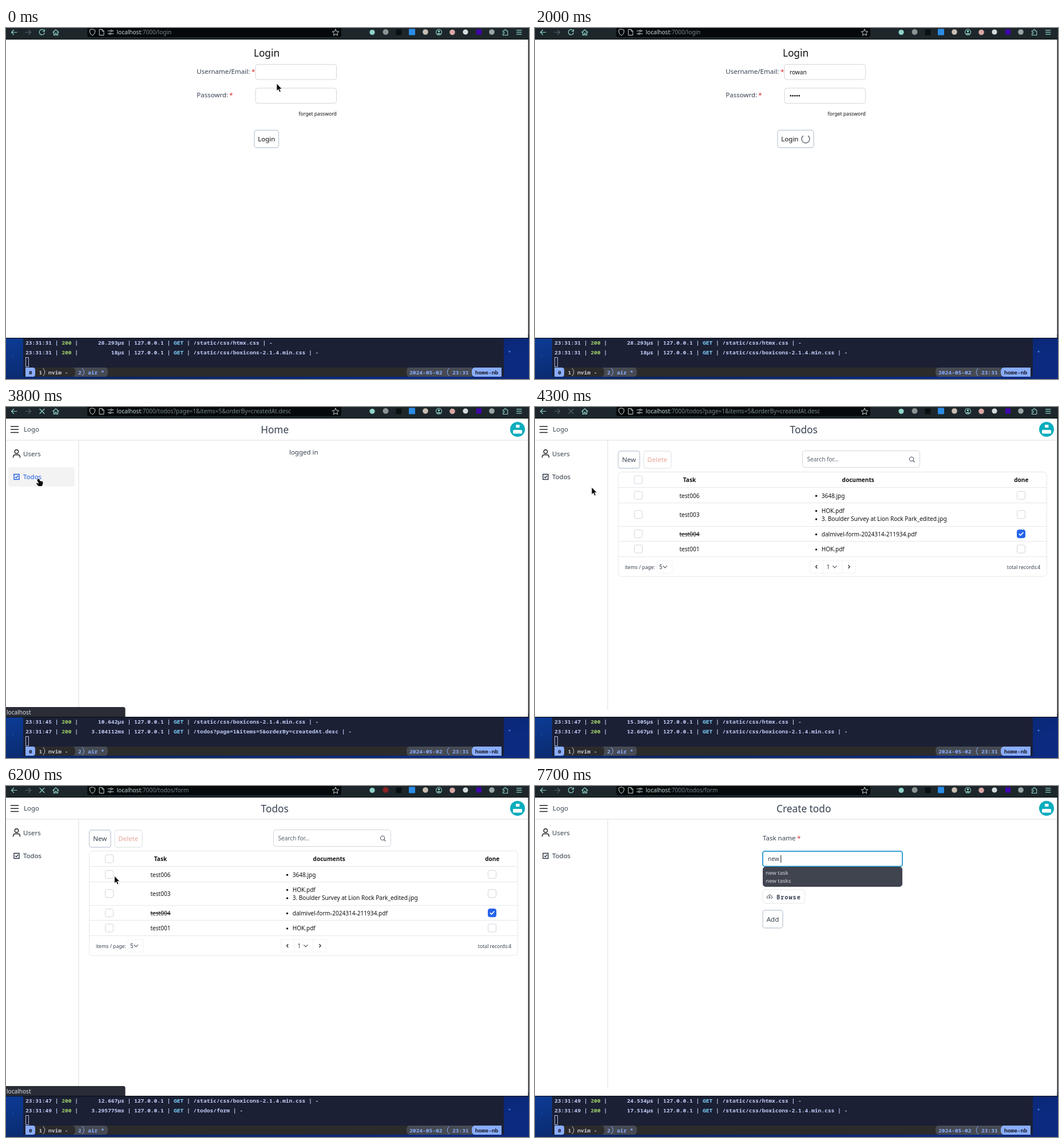
Animation, 914 px wide and 613 px high, one loop 8 s. Source, as an HTML page:

```html
<!DOCTYPE html>
<html lang="en">
<head>
<meta charset="utf-8">
<title>Todo app</title>
<style>
html, body { margin: 0; width: 100%; height: 100%; overflow: hidden; background: #fff; }
svg { display: block; width: 914px; height: 613px; }
text { font-family: "Noto Sans", sans-serif; white-space: pre; }
.mono { font-family: "Noto Sans Mono", "DejaVu Sans Mono", monospace; font-weight: 700; font-size: 9.6px; }
</style>
</head>
<body>
<svg id="stage" viewBox="0 0 914 613" xmlns="http://www.w3.org/2000/svg"></svg>
<script>
const LOOP = 8000, STEP = 100;
const INK = '#374151', LINE = '#e5e7eb', EDGE = '#d1d5db', TEAL = '#8fd3ca', BLUE = '#8aadff';
const BIG = 17.28, MID = 11.52, BODY = 10.08, SMALL = 8.64;

// ---- markup helpers ----
const text = (x, y, s, size = BODY, fill = '#111', more = '') =>
  `<text x="${x}" y="${y}" font-size="${size}" fill="${fill}" ${more}>${s}</text>`;
const mid = (x, y, s, size, fill, more = '') => text(x, y, s, size, fill, 'text-anchor="middle" ' + more);
const mono = (x, y, s, fill, more = '') => `<text class="mono" x="${x}" y="${y}" fill="${fill}" ${more}>${s}</text>`;
const rect = (x, y, w, h, fill, r = 0, stroke = 'none', sw = 1) =>
  `<rect x="${x}" y="${y}" width="${w}" height="${h}" rx="${r}" fill="${fill}" stroke="${stroke}" stroke-width="${sw}"/>`;
const dot = (x, y, r, fill, stroke = 'none', sw = 1) =>
  `<circle cx="${x}" cy="${y}" r="${r}" fill="${fill}" stroke="${stroke}" stroke-width="${sw}"/>`;
const path = (d, stroke = TEAL, sw = 1.2, fill = 'none') =>
  `<path d="${d}" stroke="${stroke}" stroke-width="${sw}" fill="${fill}" stroke-linecap="round" stroke-linejoin="round"/>`;
const group = (id, body, more = '') => `<g id="${id}" ${more}>${body}</g>`;
const button = (x, y, w, h) => rect(x, y, w, h, '#fff', 4, '#c3cddb', 1.4);
const field = (x, y, w, h, stroke = EDGE, sw = 1) => rect(x, y, w, h, '#fff', 4, stroke, sw);
const focusRing = (id, x, y, w, h) => group(id, field(x, y, w, h, '#2596d1', 1.8));
const star = (x, y) => text(x, y, '*', MID, '#dc2626', 'font-weight="500"');
const bold = 'font-weight="600"', medium = 'font-weight="500"';

// ---- desktop and terminal ----
function desktop() {
  const sky = `<defs><linearGradient id="sky" x2="1" y2="0.4"><stop offset="0" stop-color="#0c3d98"/>
    <stop offset="0.5" stop-color="#0a2462"/><stop offset="1" stop-color="#0b2a80"/></linearGradient></defs>`;
  let s = sky + rect(0, 535, 914, 78, 'url(#sky)') + dot(880, 565, 1.6, '#3f7fd8') + dot(12, 572, .8, '#3a6cc4');
  s += rect(30, 535, 840, 74, '#1b2034') + group('log', '') + rect(34.5, 575.5, 5, 16, 'none', 0, '#c0caf5', .9);
  s += rect(34, 593, 832, 16, '#2b2b2c');
  s += path('M34 593H47Q51 593 51 597V605Q51 609 47 609H34Z', 'none', 0, BLUE) + mono(40, 604.5, '0', '#1a1b26');
  s += mono(57.5, 604.5, '1', '#c3c7d4') + path('M65 594.5Q71 601 65 607.5', '#c3c7d4', 1) + mono(74, 604.5, 'nvim -', '#c3c7d4');
  s += path('M116 593H173Q178 593 178 601T173 609H116Q121 609 121 601T116 593Z', 'none', 0, '#464a52');
  s += mono(126, 604.5, '2', BLUE) + path('M133.5 594.5Q139.5 601 133.5 607.5', BLUE, 1) + mono(143, 604.5, 'air *', BLUE);
  s += path('M705 593H815V609H705Q700 609 700 601T705 593Z', 'none', 0, '#464a52');
  s += mono(705, 604.5, '2024-05-02', BLUE) + path('M774 594.5Q768 601 774 607.5', BLUE, 1) + mono(780, 604.5, '23:31', BLUE);
  s += path('M819 593H866V609H819Q814 609 814 601T819 593Z', 'none', 0, BLUE) + mono(820, 604.5, 'home-nb', '#1a1b26');
  return s;
}
const ASSET = ['/static/css/htmx.css', '/static/css/boxicons-2.1.4.min.css'];
function logLine(y, [time, took, url]) {
  const span = (fill, s) => `<tspan fill="${fill}">${s}</tspan>`;
  return mono(34, y, `${time} | ${span('#9ece6a', 200)} |${took.padStart(14)} | 127.0.0.1 | ${span('#7dcfff', 'GET')} | ${url.replace(/&/g, '&amp;')} | -`, '#c0caf5');
}
const assets = (sec, a, b) => [['23:31:' + sec, a, ASSET[0]], ['23:31:' + sec, b, ASSET[1]]];
const LIST = '/todos?page=1&items=5&orderBy=createdAt.desc';
const LOGS = [
  [0, assets(31, '28.293µs', '18µs')],
  [2100, assets(45, '11.106µs', '10.642µs')],
  [3500, [assets(45, '11.106µs', '10.642µs')[1], ['23:31:47', '3.104112ms', LIST]]],
  [4000, assets(47, '15.305µs', '12.667µs')],
  [5900, [assets(47, '15.305µs', '12.667µs')[1], ['23:31:49', '3.295775ms', '/todos/form']]],
  [6400, assets(49, '24.534µs', '17.514µs')]
];
const URLS = [[0, '/login'], [2100, '/home'], [3500, LIST], [5900, '/todos/form']];

// ---- browser toolbar ----
function toolbar() {
  let s = rect(0, 0, 914, 20, '#1d272b') + rect(142, -10, 444, 26, '#05090b', 4) + rect(0, 19, 914, 1.2, '#0a0f11');
  s += path('M19 7.5H9.5M13.5 3.5L9.5 7.5L13.5 11.5') + path('M34 7.5H43.5M39.5 3.5L43.5 7.5L39.5 11.5', '#536066');
  s += group('reload', path('M67.3 8.5A4.6 4.6 0 1 1 66.3 4.2M67.5 2.8V5.8H64.5'));
  s += group('stop', `<path d="M59 3.5L67 11.5M67 3.5L59 11.5" stroke-width="1.2" stroke-linecap="round"/>`);
  s += path('M82 7.5L87 3L92 7.5M83.5 6.5V12.3H86V9H88V12.3H90.5V6.5');
  s += path('M151 2L155.5 3.6V7Q155.3 11 151 13Q146.7 11 146.5 7V3.6Z', '#c7d3d4', 1);
  s += path('M163.5 2.5H168L171 5.5V12.5H163.5ZM168 2.5V5.5H171', '#c7d3d4', 1);
  s += path('M178 5H182M186 5H188M178 10H180M184 10H188', '#c7d3d4', 1) + dot(184, 5, 1.5, 'none', '#c7d3d4') + dot(182, 10, 1.5, 'none', '#c7d3d4');
  s += `<text y="11.2" x="193.5" font-size="${BODY}" fill="#c6d8d8">localhost<tspan id="url" fill="#79878b"></tspan></text>`;
  s += path('M576 2.2L577.7 5.9L581.7 6.3L578.7 9L579.6 13L576 10.9L572.4 13L573.3 9L570.3 6.3L574.3 5.9Z', '#c7d3d4', 1);
  s += dot(640, 7.5, 4.6, TEAL) + `<circle id="guard" cx="663.5" cy="7" r="5"/>`;
  s += rect(681.5, 2.5, 10, 10, '#0a1012', 1) + rect(704, 1.5, 11, 11, '#2a8ce6', 1);
  s += dot(733, 7, 4.8, '#c9beb2');
  s += dot(756.5, 7.3, 5, 'none', TEAL, 1.1) + dot(756.5, 5.8, 1.8, TEAL) + path('M753.4 10.5Q756.5 7.6 759.6 10.5Z', TEAL, .8, TEAL);
  s += dot(780, 7.5, 4.8, '#d9a7a4') + dot(803, 7, 4.6, '#d5dadb') + rect(822, 2.5, 9, 9, '#4005b0') + dot(849, 7, 4.8, '#98a5a6');
  s += path('M868.5 5H871V3.6Q872.5 .8 874 3.6V5H876.7V12.5H868.5V10Q871 10 871 8.6T868.5 7.2Z', TEAL, 1.1);
  return s + path('M892.5 3.8H901M892.5 7.3H901M892.5 10.8H901', TEAL, 1.2);
}

// ---- pages ----
function login() {
  return mid(455.5, 50, 'Login', BIG, '#111') +
    text(333.3, 79.5, 'Username/Email:', MID, INK, medium) + star(429, 79.5) +
    text(333.3, 121, 'Passowrd:', MID, INK, medium) + star(390.3, 121) +
    field(436, 63.5, 141.5, 26.5) + field(436, 105, 141.5, 26.5) +
    focusRing('ringUser', 436, 63.5, 141.5, 26.8) + focusRing('ringPass', 436, 105, 141.5, 26.8) +
    text(445, 80.7, '', BODY, '#111', 'id="user"') + group('dots', '') +
    mid(544.7, 152.7, 'forget password', SMALL, '#111') +
    group('idle', button(434, 178.5, 42.5, 30.5) + mid(455.3, 198, 'Login', MID, '#111')) +
    group('busy', button(424, 178.5, 63, 30.5) + text(430.3, 198, 'Login', MID) +
      `<path id="spin" d="M477.2 188.2A7 7 0 1 1 468.8 188.2" fill="none" stroke="#777c88" stroke-width="1.7"/>`);
}
function shell() {
  return path('M8.5 34H21.5M8.5 39.2H21.5M8.5 44.4H21.5', '#222', 1.5) + text(31, 43, 'Logo', MID, INK) +
    mid(469.7, 46, '', BIG, INK, 'id="title"') +
    dot(894, 39, 13, '#08adbd') + rect(891, 31, 6.5, 5, '#fff', .8) + rect(886, 40, 16, 6.5, '#fff', 1.5) +
    rect(0, 57.3, 912, 1.4, LINE) + rect(126.3, 58, 1.4, 471, LINE) +
    dot(18.5, 78, 3.2, 'none', '#222', 1.4) + path('M12.5 88Q12.5 83.5 16 83.5H21Q24.5 83.5 24.5 88', '#222', 1.4) +
    text(30, 86, 'Users', MID, INK) + group('hover', rect(4, 105, 116, 34, '#f3f3f4', 4)) +
    `<g id="todosLink"><path d="M14 117.5H23V126.5H14ZM16.2 122L18 123.8L21.2 120" fill="none" stroke="currentColor" stroke-width="1.4"/>` +
    text(30, 126, 'Todos', MID, 'currentColor') + '</g>';
}
const ROWS = [
  [154.3, 'test006', ['3648.jpg']],
  [187.8, 'test003', ['HOK.pdf', '3. Boulder Survey at Lion Rock Park_edited.jpg']],
  [221.6, 'test004', ['dalmivel-form-2024314-211934.pdf'], true],
  [248, 'test001', ['HOK.pdf']]
];
function check(x, y, on) {
  const box = rect(x - 7, y - 7, 14, 14, on ? '#2563eb' : '#fff', 3, on ? '#2563eb' : EDGE);
  return on ? box + path(`M${x - 3.2} ${y + .2}L${x - 1} ${y + 2.5}L${x + 3.4} ${y - 2.3}`, '#fff', 1.7) : box;
}
function todos() {
  let s = button(145.5, 77, 37.5, 30) + mid(164.2, 96, 'New', MID, INK);
  s += rect(190, 77, 48, 30, '#fff', 4, LINE, 1.3) + mid(213.8, 96, 'Delete', MID, '#e8a697');
  s += field(467.5, 76.5, 205, 29) + text(475.5, 95.3, 'Search for...', BODY, '#5b6472');
  s += dot(658, 90.9, 3.6, 'none', '#4b5563', 1.1) + path('M660.8 93.7L663 96', '#4b5563');
  s += rect(145.5, 113.5, 749, 182.5, '#fff', 6, LINE);
  for (const y of [140.5, 167.5, 208.5, 234.5, 261.5]) s += rect(145.5, y - .5, 749, 1, LINE);
  s += check(180.5, 127) + mid(270, 131, 'Task', BODY, '#111', bold) + mid(564.7, 131, 'documents', BODY, '#111', bold) + mid(849.8, 131, 'done', BODY, '#111', bold);
  for (const [y, task, docs, done] of ROWS) {
    s += check(180.5, y) + check(849.5, y, done);
    s += mid(270, y + 4.2, task, BODY, '#111', medium + (done ? ' text-decoration="line-through"' : ''));
    docs.forEach((doc, i) => {
      const cy = y + .4 + (i - (docs.length - 1) / 2) * 14.5;
      s += dot(491.5, cy + .5, 1.7, '#111') + text(500.7, cy + 3.8, doc, BODY, '#111', medium);
    });
  }
  s += text(157, 282.5, 'items / page:', SMALL, INK, medium) + rect(213, 268, 27, 22, '#fff', 3, '#f1f2f4');
  s += text(217, 283, '5', BODY, INK) + path('M224 277.5L227.2 281L230.4 277.5', INK, 1.1);
  s += rect(480.5, 268, 79.5, 22, '#fff', 3, '#f1f2f4') + rect(503, 268, 1, 22, '#f1f2f4') + rect(536.5, 268, 1, 22, '#f1f2f4');
  s += path('M492.8 276.5L490.6 279L492.8 281.5M547.8 276.5L550 279L547.8 281.5', '#222', 1.2);
  s += text(509.5, 283, '1', BODY, INK) + path('M520.5 277.5L523.7 281L526.9 277.5', INK, 1.1);
  return s + text(883.3, 282.5, 'total records:4', SMALL, INK, medium + ' text-anchor="end"');
}
function form() {
  return text(398, 94.5, 'Task name', MID, INK, medium) + star(458, 94.5) +
    field(398, 113.8, 244, 26.7) + focusRing('ringTask', 398, 113.8, 244, 26.7) + text(407, 131.2, '', BODY, INK, 'id="task"') +
    rect(398, 181, 73.5, 24, '#fff', 5, LINE) +
    path('M407.3 196.5Q405 196 405.4 193.8Q406 191.8 407.8 192Q408.6 189.6 411 190Q413 190.4 413 192.5Q415 193 414.7 195Q414.2 196.5 413 196.5M410 197V193.2M408.5 194.5L410 193L411.5 194.5', INK, 1) +
    `<text class="mono" x="422" y="198" fill="${INK}" style="font-size:${BODY}px" letter-spacing="1.1">Browse</text>` +
    button(398, 217, 35, 31) + mid(415.5, 236.7, 'Add', MID, INK);
}
const menu = (x, y, w, items) => rect(x, y, w, 6 + items.length * 14.5, '#40444f', 5) +
  items.map((s, i) => text(x + 5, y + 13.7 + i * 14.5, s, 9.6, '#d3d5d9')).join('');

const arrow = `<path d="M0 0V13L3 10.3L5 15L7.3 14L5.2 9.5H9.2Z" fill="#0a0a0a" stroke="#fff" stroke-width=".7"/>`;
const hand = `<path d="M-1 1Q1 -1.5 3 1L4 3.5L8 4Q9.5 5 9 9L7 13H1L-3 8.5Q-3.5 6.5 -1 7L1 8L-1.8 2.5Z" fill="#0a0a0a" stroke="#fff" stroke-width=".7"/>`;
const beam = path('M-2 -7Q0 -7 0 -5Q0 -7 2 -7M0 -5V5M-2 7Q0 7 0 5Q0 7 2 7', '#222', 1);

document.getElementById('stage').innerHTML = desktop() +
  rect(0, 20, 912.5, 521, '#fff') + rect(912.5, 0, 1.5, 541, '#20262c') + rect(0, 541, 914, 1.2, '#0b0f1c') + toolbar() +
  group('login', login()) + group('shell', shell()) + group('home', mid(520.3, 83, 'logged in', MID, INK)) +
  group('todos', todos()) + group('form', form()) + group('menu', '') +
  group('status', path('M0 524H205Q208.5 524 208.5 527.5V541H0Z', 'none', 0, '#2a2d36') + text(1, 536.7, 'localhost', BODY, '#dde1e6')) +
  `<rect id="caret" width="1" height="13" fill="#111"/>` +
  group('arrow', arrow) + group('hand', hand) + group('beam', beam);

const el = {};
document.querySelectorAll('[id]').forEach(n => el[n.id] = n);
const show = (id, on) => el[id].style.display = on ? '' : 'none';
const within = (t, a, b) => t >= a && t < b;
const latest = (list, t) => list.filter(e => e[0] <= t).pop()[1];
const put = (node, html) => { if (node.last !== html) node.innerHTML = node.last = html; };

// ---- pointer: time, x, y, shape after that time ----
const WAY = [
  [0, 473, 97, 'arrow'], [100, 473, 80, 'beam'], [700, 473, 80, ''],
  [2600, 486, 84, 'arrow'], [3000, 84, 118, 'hand'], [3100, 37, 118, 'hand'], [3500, 37, 118, 'hand'],
  [3900, 62, 128, 'hand'], [4200, 94, 138, 'hand'], [4300, 99, 140, 'arrow'], [4500, 84, 160, 'arrow'], [4800, 136, 158, 'arrow'],
  [5000, 136, 158, 'arrow'], [5200, 205, 128, 'arrow'], [5500, 168, 94, 'hand'], [5900, 168, 94, 'hand'],
  [6000, 172, 112, 'arrow'], [6200, 189.5, 157, 'arrow'], [6600, 470, 128, 'beam'], [7400, 470, 128, '']
];
function pointer(t) {
  const i = WAY.filter(p => p[0] <= t).length - 1;
  const [t0, x0, y0, shape] = WAY[i], [t1, x1, y1] = WAY[i + 1] || [LOOP, x0, y0];
  const k = (t - t0) / (t1 - t0);
  for (const id of ['arrow', 'hand', 'beam']) show(id, id === shape);
  if (shape) el[shape].setAttribute('transform', `translate(${x0 + (x1 - x0) * k} ${y0 + (y1 - y0) * k})`);
}

const typed = (word, t, start) => word.slice(0, Math.max(0, Math.floor((t - start) / STEP) + 1));
function caret(x, y) {
  el.caret.setAttribute('x', x);
  el.caret.setAttribute('y', y);
}

function draw(now) {
  const t = Math.floor((now % LOOP) / STEP) * STEP;
  const page = t < 2100 ? 'login' : t < 4000 ? 'home' : t < 6400 ? 'todos' : 'form';
  for (const id of ['login', 'home', 'todos', 'form']) show(id, id === page);
  show('shell', page !== 'login');
  el.title.textContent = { login: '', home: 'Home', todos: 'Todos', form: 'Create todo' }[page];
  put(el.log, latest(LOGS, t).map((l, i) => logLine(552.7 + i * 17.2, l)).join(''));
  el.url.textContent = ':7000' + latest(URLS, t);

  // loading state
  const loading = within(t, 2100, 2200) || within(t, 3400, 4000) || within(t, 5800, 6400);
  const settling = within(t, 4000, 4400) || within(t, 6400, 7000);
  show('reload', !loading && !settling);
  show('stop', loading || settling);
  el.stop.setAttribute('stroke', loading ? TEAL : '#536066');
  show('status', within(t, 3400, 4000) || within(t, 5800, 6400));
  el.guard.setAttribute('fill', within(t, 5900, 6400) ? '#8b2323' : '#8b9292');

  // login form
  const user = typed('rowan', t, 700), dots = t < 1600 ? 0 : Math.min(5, 1 + (t - 1600) / 50);
  el.user.textContent = user;
  put(el.dots, Array.from({ length: dots }, (_, i) => dot(446.8 + i * 3.75, 118.3, 1.35, '#111')).join(''));
  show('ringUser', within(t, 200, 1300));
  show('ringPass', within(t, 1300, 1900));
  show('busy', t >= 1900);
  show('idle', t < 1900);
  el.spin.setAttribute('transform', `rotate(${(t - 2000) * .36} 473 193.8)`);

  // sidebar and new task
  const over = within(t, 3000, 4200);
  show('hover', over);
  el.todosLink.style.color = over ? '#1d5be0' : '#2b3442';
  const task = typed('new ', t, 7400);
  el.task.textContent = task;
  show('ringTask', t >= 6700);

  let list = '';
  if (within(t, 700, 1200)) list = menu(435, 91, 142, user.length > 1 ? ['rowan', 'rowann'] : ['rowan', 'rowann', 'rita']);
  if (task) list = menu(398, 141, 244, task.length > 1 ? ['new task', 'new tasks'] : ['new task', 'new tasks', 'notes', 'next task']);
  put(el.menu, list);

  show('caret', within(t, 200, 1900) || t >= 6700);
  if (t < 1300) caret(445 + el.user.getComputedTextLength(), 70.5);
  else if (t < 1900) caret(445 + dots * 3.75, 112);
  else if (t >= 6700) caret(407 + el.task.getComputedTextLength(), 120.8);
  pointer(t);
}
function tick(now) {
  draw(now);
  requestAnimationFrame(tick);
}
draw(0);
requestAnimationFrame(tick);
</script>
</body>
</html>
```
